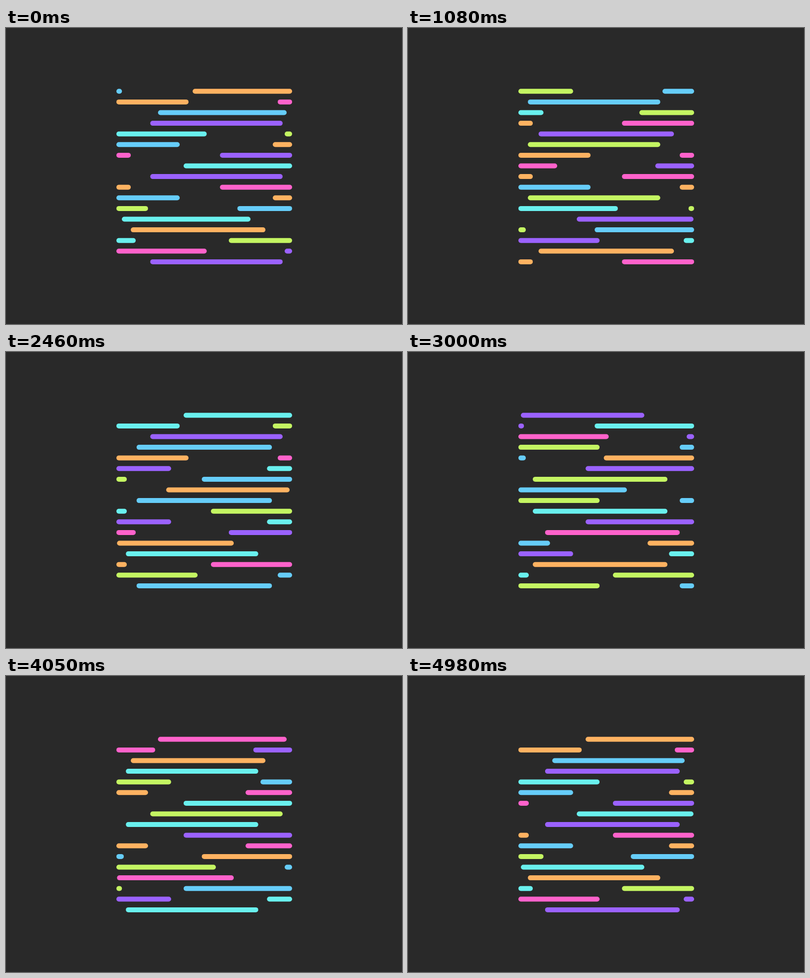
Write an HTML page that moves like this. It is 800 px wide and 600 px high and loops after 5.01 s.

```html
<!DOCTYPE html>
<html lang="en">
<head>
<meta charset="utf-8">
<title>Flowing lines</title>
<style>
  html, body { margin: 0; width: 100%; height: 100%; overflow: hidden; background: #292929; }
  svg { display: block; width: 100vw; height: 100vh; }
  line { stroke-width: 10; stroke-linecap: round; }
</style>
</head>
<body>
<svg id="stage" viewBox="0 0 800 600"></svg>
<script>
const STEP = 30;          // ms per tick
const LOOP = 167;         // ticks per loop
const TRAVEL = 28;        // ticks for one end to cross
const TAIL_DELAY = 16;    // ticks before the tail follows the head
const LEFT = 228, WIDTH = 345, TOP = 128.3, PITCH = 21.6;

// Each colour with the tick at which its stroke sets off
const STROKES = [
  ['#66cdf9', 0], ['#c4f562', 27], ['#69f0ee', 55],
  ['#9b62ff', 83], ['#ff62cb', 111], ['#ffb261', 139]
];
const ROW_PHASES = [1, 151, 25, 107, 69, 11, 115, 83, 107, 143, 11, 34, 74, 160, 60, 125, 107];

const stage = document.getElementById('stage');

function makeLine(color, y) {
  const el = document.createElementNS('http://www.w3.org/2000/svg', 'line');
  el.setAttribute('stroke', color);
  el.setAttribute('y1', y);
  el.setAttribute('y2', y);
  stage.appendChild(el);
  return el;
}

const lines = ROW_PHASES.flatMap((phase, row) =>
  STROKES.map(([color, start]) => ({
    el: makeLine(color, TOP + row * PITCH),
    shift: phase - start + LOOP
  })));

function position(age) {
  const s = Math.min(1, Math.max(0, age / TRAVEL));
  return LEFT + WIDTH * s * s * (3 - 2 * s);
}

function draw(ms) {
  const tick = Math.floor(ms / STEP + 0.01) % LOOP;
  for (const { el, shift } of lines) {
    const age = (tick + shift) % LOOP;
    const visible = age > 0 && age < TRAVEL + TAIL_DELAY;
    el.setAttribute('visibility', visible ? 'visible' : 'hidden');
    if (!visible) continue;
    el.setAttribute('x1', position(age - TAIL_DELAY));
    el.setAttribute('x2', position(age));
  }
}

const origin = performance.now();
function animate() {
  draw(performance.now() - origin);
  requestAnimationFrame(animate);
}
animate();
</script>
</body>
</html>
```
